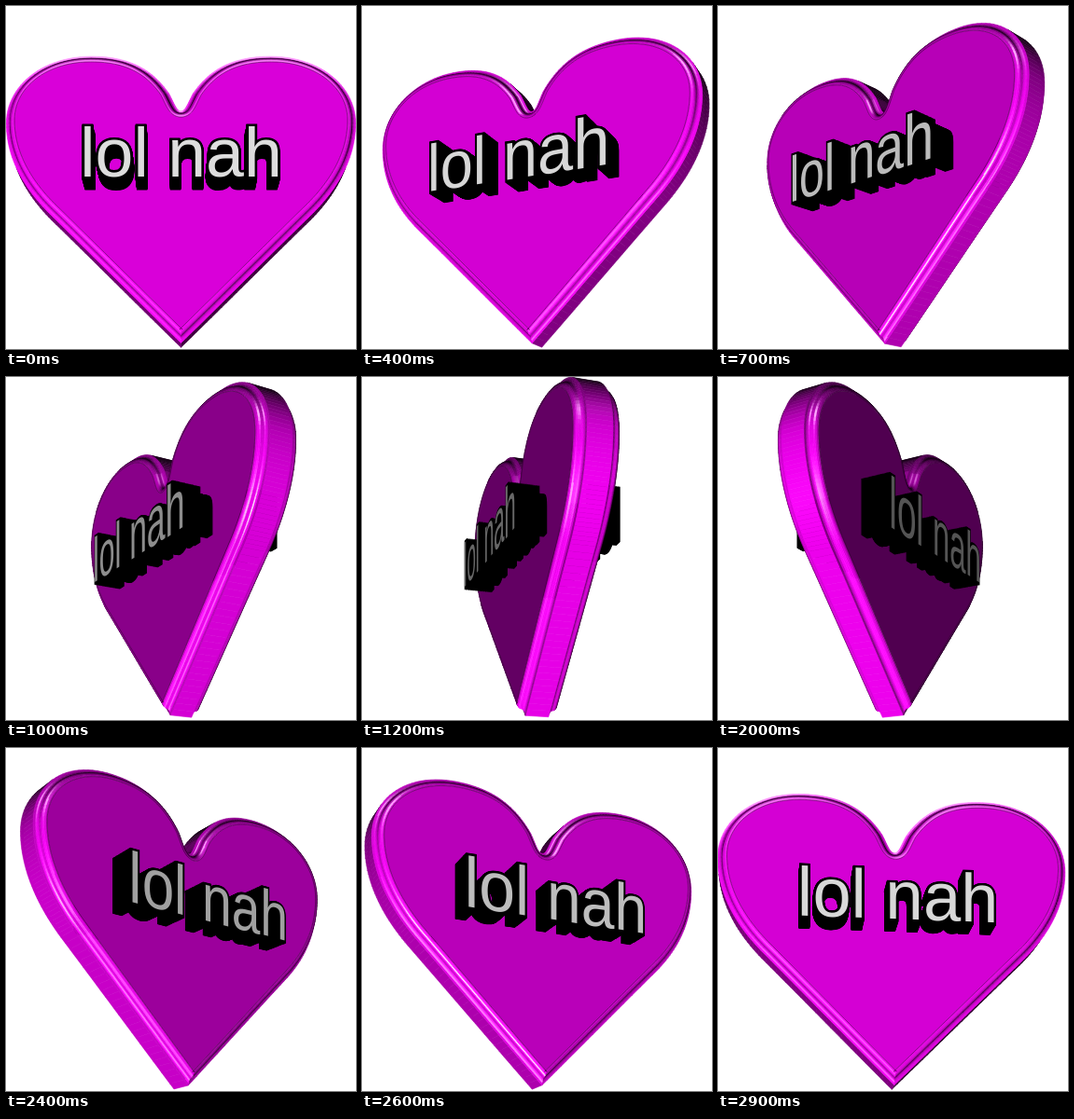
These frames come from a looping animation (375x368 px, 3000 ms). An HTML page with a canvas:

```html
<!DOCTYPE html>
<html lang="en">
<head>
<meta charset="utf-8">
<title>lol nah</title>
<style>
html, body { margin: 0; width: 100%; height: 100%; overflow: hidden; background: #fff; }
canvas { display: block; }
</style>
</head>
<body>
<canvas width="375" height="368"></canvas>
<script>
const ctx = document.querySelector('canvas').getContext('2d');
const CENTER = 187.5, HORIZON = 575, DISTANCE = 1150;
const LIGHT = [-0.13, 0.45, 0.85], GLINT = [0, -0.25, 0.97];
const BAND_Z = 13, COVE = 5, FACE_Z = 22.5, FACE_INSET = 10;
const TEXT_Z = 55, BASELINE = 202;
const FONT = '70px "Liberation Sans", Arial, sans-serif';

// Right half of the heart, from cleft to tip, as cubic curves
const curves = [
  [0, 118, 5, 118, 7, 110, 13, 99],
  [13, 99, 33, 70, 60, 60, 95, 60],
  [95, 60, 148, 60, 185, 92, 185, 131],
  [185, 131, 185, 167, 167, 199, 140, 226],
  [140, 226, 95, 270, 48, 317, 0, 364]
];

function bezier(c, t, axis) {
  const u = 1 - t;
  return u * u * u * c[axis] + 3 * u * u * t * c[axis + 2] +
    3 * u * t * t * c[axis + 4] + t * t * t * c[axis + 6];
}

function heartOutline() {
  const half = [];
  for (const c of curves)
    for (let i = 0; i < 26; i++) half.push([bezier(c, i / 26, 0), bezier(c, i / 26, 1)]);
  const mirrored = half.slice(1).reverse().map(([x, y]) => [-x, y]);
  return [...half, [0, 364], ...mirrored];
}

const outline = heartOutline(), count = outline.length;
const edgeNormals = outline.map(([x, y], i) => {
  const [nx, ny] = outline[(i + 1) % count];
  const len = Math.hypot(nx - x, ny - y);
  return [(ny - y) / len, (x - nx) / len];
});

function insetOutline(inset) {
  return outline.map(([x, y], i) => {
    const a = edgeNormals[(i + count - 1) % count], b = edgeNormals[i];
    const mx = a[0] + b[0], my = a[1] + b[1], len = Math.hypot(mx, my);
    const d = inset / Math.max(len / 2, 0.6) / len;
    return [x - mx * d, y - my * d];
  });
}

// Edge profile as [inset, z]: flat band, hollow cove, rounded bead
const quarter = steps => Array.from({ length: steps }, (_, i) => (i + 1) / steps * Math.PI / 2);
const bead = BAND_Z + COVE;
const front = [
  [0, BAND_Z],
  ...quarter(4).map(t => [COVE * Math.sin(t), BAND_Z + COVE * (1 - Math.cos(t))]),
  ...quarter(5).map(t => [
    COVE + (FACE_INSET - COVE) * (1 - Math.cos(t)),
    bead + (FACE_Z - bead) * Math.sin(t)
  ])
];
const profile = [...front.map(([d, z]) => [d, -z]).reverse(), ...front];
const rings = profile.map(([d, z]) => insetOutline(d).map(([x, y]) => [x, y, z]));

function rotate([x, y, z], angle) {
  const c = Math.cos(angle), s = Math.sin(angle);
  return [x * c - z * s, y, x * s + z * c];
}

function project([x, y, z]) {
  const k = DISTANCE / (DISTANCE - z);
  return [CENTER + x * k, HORIZON - (HORIZON - y) * k];
}

const dot = (a, b) => a[0] * b[0] + a[1] * b[1] + a[2] * b[2];

function tracePath(points) {
  ctx.beginPath();
  for (const p of points) ctx.lineTo(...project(p));
  ctx.closePath();
}

function edgeColor(normal) {
  const lit = Math.max(0, dot(normal, LIGHT));
  const glint = Math.max(0, dot(normal, GLINT));
  const shine = 210 * Math.pow(lit / 0.97, 60) + 160 * Math.pow(glint, 60);
  const base = 255 * Math.max(0.1, lit * 1.05) + shine / 2;
  return `rgb(${base},${shine},${base})`;
}

function drawEdge(angle) {
  const turned = rings.map(ring => ring.map(p => rotate(p, angle)));
  const quads = [];
  for (let r = 0; r + 1 < rings.length; r++) {
    const dInset = profile[r + 1][0] - profile[r][0], dz = profile[r + 1][1] - profile[r][1];
    const len = Math.hypot(dInset, dz);
    for (let i = 0; i < count; i++) {
      const j = (i + 1) % count, [nx, ny] = edgeNormals[i];
      const normal = rotate([nx * dz / len, ny * dz / len, dInset / len], angle);
      const points = [turned[r][i], turned[r][j], turned[r + 1][j], turned[r + 1][i]];
      const [x, y, z] = points[0];
      if (dot(normal, [-x, HORIZON - y, DISTANCE - z]) <= 0) continue;
      quads.push({ points, color: edgeColor(normal), depth: points.reduce((sum, p) => sum + p[2], 0) });
    }
  }
  quads.sort((a, b) => a.depth - b.depth);
  ctx.lineWidth = 0.6;
  for (const { points, color } of quads) {
    tracePath(points);
    ctx.fillStyle = ctx.strokeStyle = color;
    ctx.fill();
    ctx.stroke();
  }
}

const faceShade = angle => 255 * Math.max(0, dot(rotate([0, 0, 1], angle), LIGHT));

function drawFace(angle) {
  const shade = faceShade(angle);
  const glare = Math.sin(angle) < 0 ? Math.max(0, 1 - Math.cos(angle) / 0.25) : 0;
  const base = shade + 190 * glare;
  tracePath(rings[rings.length - 1].map(p => rotate(p, angle)));
  ctx.fillStyle = `rgb(${base},${127 * glare},${base})`;
  ctx.fill();
  ctx.lineWidth = 1;
  ctx.strokeStyle = 'rgba(50,0,50,0.5)';
  ctx.stroke();
}

ctx.font = FONT;
const letters = [];
let pen = -ctx.measureText('lol nah').width / 2;
for (const char of 'lol nah') {
  const width = ctx.measureText(char).width;
  if (char !== ' ') letters.push({ char, width, middle: pen + width / 2 });
  pen += width;
}

function placeLetter({ middle }, z, angle) {
  const at = (dx, dy) => project(rotate([middle + dx, BASELINE - 25 + dy, z], angle));
  const [x, y] = at(0, 0), [rx, ry] = at(1, 0), [dx, dy] = at(0, 1);
  ctx.setTransform(rx - x, ry - y, dx - x, dy - y, x, y);
}

function drawText(angle) {
  ctx.lineWidth = 5;
  ctx.miterLimit = 2;
  ctx.fillStyle = ctx.strokeStyle = '#000';
  for (let z = FACE_Z; z < TEXT_Z; z += 0.5)
    for (const letter of letters) {
      placeLetter(letter, z, angle);
      ctx.fillText(letter.char, -letter.width / 2, 25);
      ctx.strokeText(letter.char, -letter.width / 2, 25);
    }
  if (isFacing(angle)) {
    const gray = 4 + faceShade(angle);
    ctx.fillStyle = `rgb(${gray},${gray},${gray})`;
    for (const letter of letters) {
      placeLetter(letter, TEXT_Z, angle);
      ctx.fillText(letter.char, -letter.width / 2, 25);
    }
  }
  ctx.resetTransform();
}

const isFacing = angle => DISTANCE * Math.cos(angle) > FACE_Z;

function draw(step) {
  const angle = step * Math.PI / 30;
  const sides = [angle, angle + Math.PI];
  ctx.fillStyle = '#fff';
  ctx.fillRect(0, 0, 375, 368);
  for (const side of sides) if (!isFacing(side)) drawText(side);
  drawEdge(angle);
  for (const side of sides)
    if (isFacing(side)) {
      drawFace(side);
      drawText(side);
    }
}

let shown = -1;
function loop(now) {
  const step = Math.floor(now / 100) % 30;
  if (step !== shown) draw(shown = step);
  requestAnimationFrame(loop);
}
loop(0);
</script>
</body>
</html>
```
